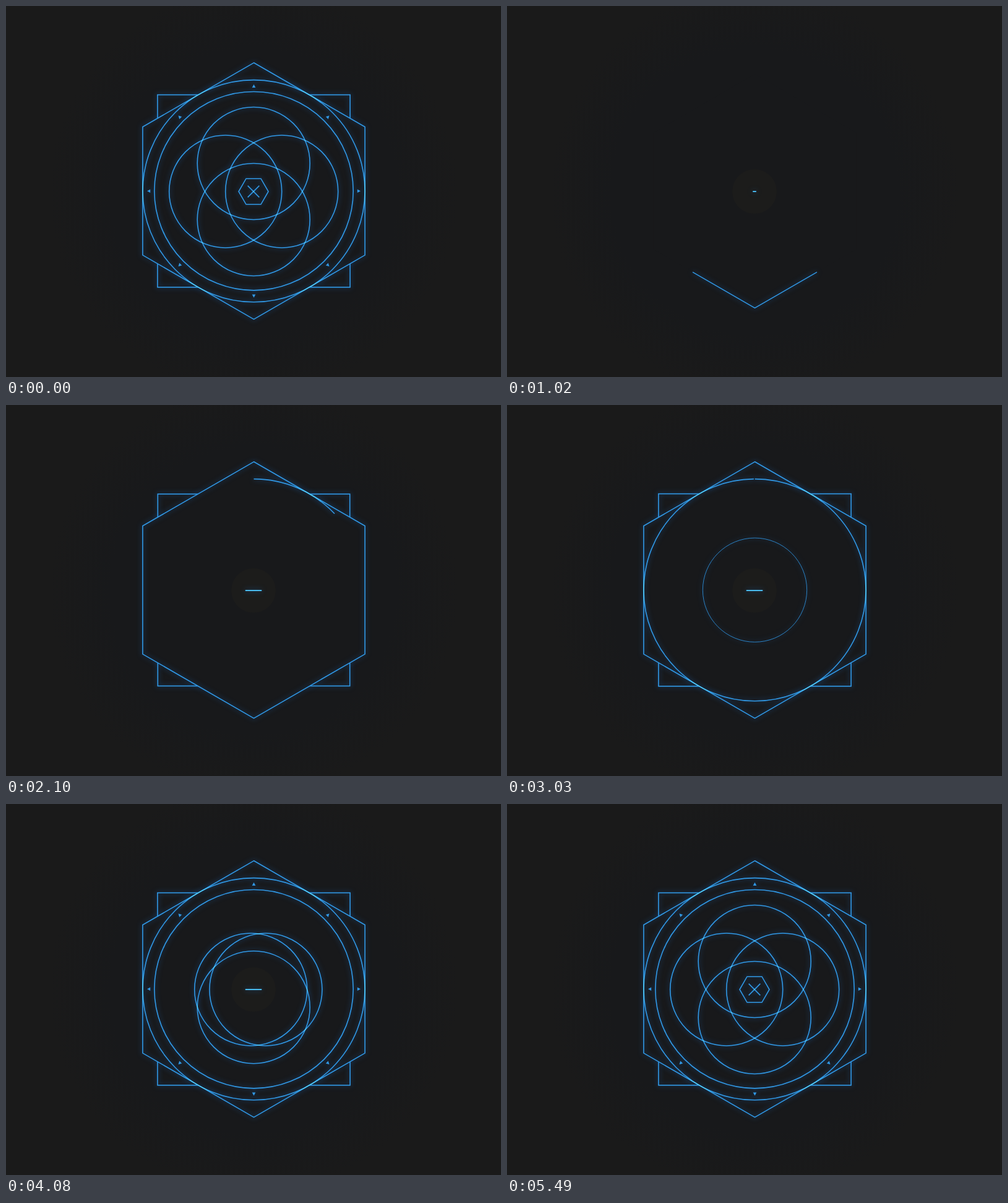
These frames come from a looping animation (800x600 px, 5.52 s). An HTML page:

```html
<!DOCTYPE html>
<html lang="en">
<head>
<meta charset="utf-8">
<title>Geometric emblem</title>
<style>
  html, body { margin: 0; width: 100%; height: 100%; overflow: hidden; background: #1a1a1a; }
  svg { display: block; width: 800px; height: 600px; }
  .line { fill: none; stroke: #3199e6; stroke-width: 1.6; }
  .glow { filter: drop-shadow(0 0 4px rgba(25, 130, 245, .55)); }
  .glow .line { mix-blend-mode: screen; }
  #marks path { fill: #3199e6; }
</style>
</head>
<body>
<svg viewBox="0 0 800 600">
  <defs>
    <radialGradient id="shade">
      <stop offset=".7" stop-color="#18191b"/>
      <stop offset="1" stop-color="#1a1a1a"/>
    </radialGradient>
  </defs>
  <circle cx="400" cy="300" r="330" fill="url(#shade)"/>
  <g id="scene">
    <g class="glow" transform="translate(400.5 299.2)">
      <rect id="square" class="line" x="-155.6" y="-155.6" width="311.2" height="311.2"/>
    </g>
    <g transform="translate(400.5 299.2)">
      <path id="cover" fill="#18191b"/>
    </g>
    <circle id="disc" cx="400" cy="300" r="36" fill="#1c1c1b"/>
    <g class="glow">
      <g transform="translate(400.5 299.2)">
        <path id="hex" class="line" pathLength="1"/>
        <circle id="ring" class="line" r="179.6" pathLength="1" transform="rotate(-90)"/>
        <circle id="inner" class="line" r="160.7"/>
        <g id="marks"></g>
      </g>
      <g id="petals" transform="translate(400.2 300)"></g>
      <g transform="translate(400 300)">
        <path id="core" class="line"/>
        <path id="bar1" class="line"/>
        <path id="bar2" class="line"/>
      </g>
    </g>
  </g>
</svg>
<script>
  const LOOP = 5520, FADE = 960;
  const $ = id => document.getElementById(id);
  const set = (el, name, value) => el.setAttribute(name, value);
  const show = (el, on) => { el.style.visibility = on ? "visible" : "hidden"; };
  const clamp = x => Math.min(1, Math.max(0, x));
  const expoOut = u => u <= 0 ? 0 : u >= 1 ? 1 : 1 - 2 ** (-10 * u);

  function add(parent, tag, attrs) {
    const el = document.createElementNS("http://www.w3.org/2000/svg", tag);
    for (const name in attrs) set(el, name, attrs[name]);
    return parent.appendChild(el);
  }

  function hexPath(r, firstAngle) {
    const points = Array.from({ length: 6 }, (_, i) => {
      const a = firstAngle + i * Math.PI / 3;
      return (r * Math.cos(a)).toFixed(2) + " " + (r * Math.sin(a)).toFixed(2);
    });
    return "M" + points.join("L") + "Z";
  }

  set($("hex"), "d", hexPath(207.4, -Math.PI / 2));
  set($("cover"), "d", hexPath(207.4, -Math.PI / 2));
  set($("core"), "d", hexPath(24, 0));

  const marks = Array.from({ length: 8 }, (_, i) => {
    const slot = add($("marks"), "g", { transform: `rotate(${i * 45}) translate(0 -169.5)` });
    return add(slot, "path", { d: "M0 -3L2.8 2.2H-2.8Z" });
  });

  // Direction and start time of each overlapping circle
  const petals = [[0, 1, 3937], [1, 0, 3999], [-1, 0, 4066], [0, -1, 4123]].map(
    ([x, y, start]) => ({ x, y, start, el: add($("petals"), "circle", { class: "line", r: 91 }) }));

  function grow(el, p) {
    show(el, p > 0);
    set(el, "transform", `scale(${p})`);
  }

  function draw(t) {
    // Until the fade is over every part keeps its final pose
    const at = (start, span = 1000) => t < FADE ? 1 : expoOut((t - start) / span);

    const out = t < FADE ? (1 + Math.cos(Math.PI * t / FADE)) / 2 : 1;
    $("scene").style.opacity = out;

    const h = at(988);
    const hexScale = `scale(${0.889 + 0.111 * h})`;
    const gap = (1 - h) / 2;
    set($("hex"), "transform", hexScale);
    set($("hex"), "stroke-dasharray", h < 1 ? `0 ${gap} ${h} ${gap}` : "none");
    show($("hex"), h > 0);
    set($("cover"), "transform", hexScale);
    show($("cover"), h > 0);

    grow($("square"), at(1240));

    const ring = at(2081);
    set($("ring"), "stroke-dasharray", ring < 1 ? `${ring} 2` : "none");
    show($("ring"), ring > 0);

    grow($("inner"), at(2924));
    marks.forEach((el, i) => grow(el, at(3420 + i * 35, 400)));

    for (const { el, x, y, start } of petals) {
      const p = at(start);
      show(el, p > 0);
      set(el, "transform", `translate(${45.5 * x * p} ${45.5 * y * p})`);
    }

    const half = 13.2 * h;
    const turn = 45 * at(4640, 850);
    [["bar1", turn], ["bar2", -turn]].forEach(([id, angle]) => {
      set($(id), "d", `M${-half} 0H${half}`);
      set($(id), "transform", `rotate(${angle})`);
      show($(id), h > 0);
    });

    const core = at(4690, 800);
    grow($("core"), core);
    $("disc").style.opacity = t < FADE ? 0 : clamp((t - FADE) / 40) * (1 - core);
  }

  const begin = performance.now();
  function frame() {
    draw((performance.now() - begin) % LOOP);
    requestAnimationFrame(frame);
  }
  frame();
</script>
</body>
</html>
```
